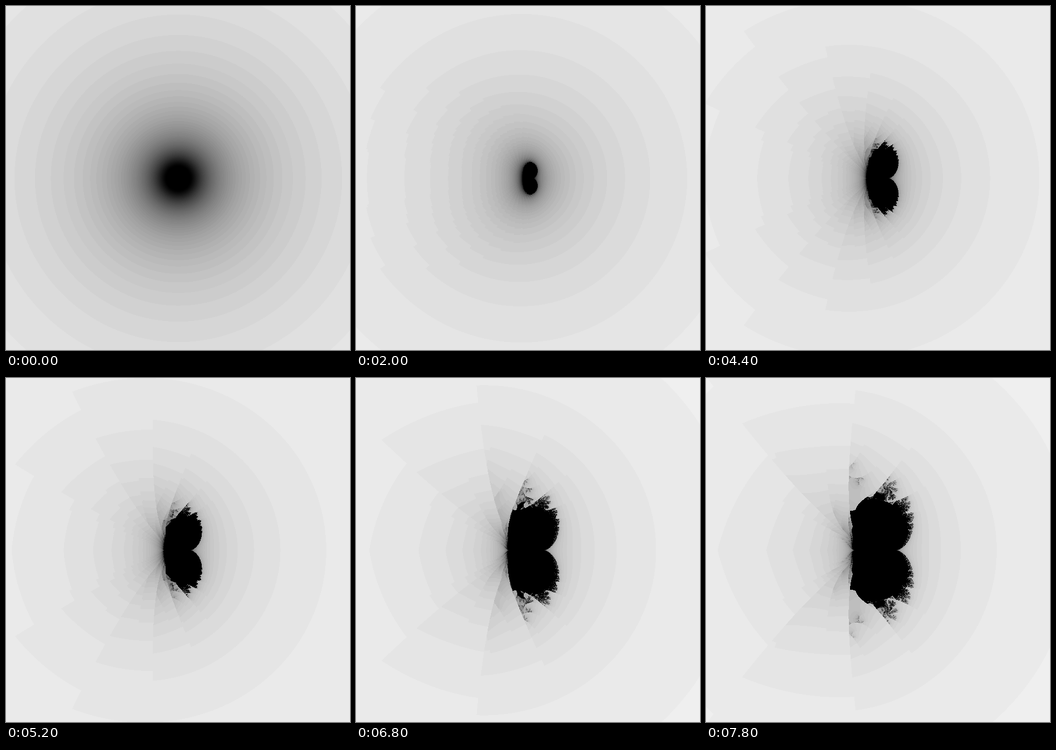
Animation, 640 px wide and 640 px high, one loop 8000 ms. Source, as an HTML page with a canvas:

```html
<!DOCTYPE html>
<html lang="en">
<head>
<meta charset="utf-8">
<title>Growing power fractal</title>
<style>
  html, body { margin: 0; width: 100%; height: 100%; overflow: hidden; background: #fff; }
  canvas { display: block; width: 640px; height: 640px; }
</style>
</head>
<body>
<canvas id="stage" width="640" height="640"></canvas>
<script>
const SIZE = 640, MID = SIZE / 2, UNIT = SIZE / 3;
const STEPS = 40, STEP_MS = 200;
const MAX_ITER = 100, BAILOUT = 10, GROWTH = 1.0112;

const ctx = document.getElementById('stage').getContext('2d');
const cache = [];

// One opaque grey per iteration count; points that never escape are black.
const greys = Uint32Array.from({ length: MAX_ITER + 1 }, (_, n) => {
  const v = Math.round(255 * (1 - n / MAX_ITER) ** 2.1);
  return (0xff000000 | v * 0x010101) >>> 0;
});

// Iterations of z -> z^power + c (principal branch) until |z| passes the bailout.
function escapeCount(cx, cy, power) {
  let x = cx, y = cy;
  for (let n = 1; n < MAX_ITER; n++) {
    const r2 = x * x + y * y;
    if (r2 > BAILOUT * BAILOUT) return n;
    const radius = Math.exp(Math.log(r2) * power / 2);
    const angle = Math.atan2(y, x) * power;
    x = radius * Math.cos(angle) + cx;
    y = radius * Math.sin(angle) + cy;
  }
  return x * x + y * y > BAILOUT * BAILOUT ? MAX_ITER - 1 : MAX_ITER;
}

function render(step) {
  const image = ctx.createImageData(SIZE, SIZE);
  const pixels = new Uint32Array(image.data.buffer);
  const power = GROWTH ** step;
  for (let row = 0; row <= MID; row++) {
    const cy = (MID - row) / UNIT;
    for (let col = 0; col < SIZE; col++) {
      pixels[row * SIZE + col] = greys[escapeCount((col - MID) / UNIT, cy, power)];
    }
    // The lower half mirrors the upper one.
    if (row > 0 && row < MID) {
      pixels.copyWithin((SIZE - row) * SIZE, row * SIZE, (row + 1) * SIZE);
    }
  }
  return image;
}

const imageFor = step => cache[step] ??= render(step);

let shown = -1;
function tick() {
  const step = Math.floor(performance.now() / STEP_MS) % STEPS;
  if (step !== shown) {
    ctx.putImageData(imageFor(step), 0, 0);
    shown = step;
  } else {
    imageFor((step + 1) % STEPS); // prepare the next picture while idle
  }
  requestAnimationFrame(tick);
}
tick();
</script>
</body>
</html>
```
